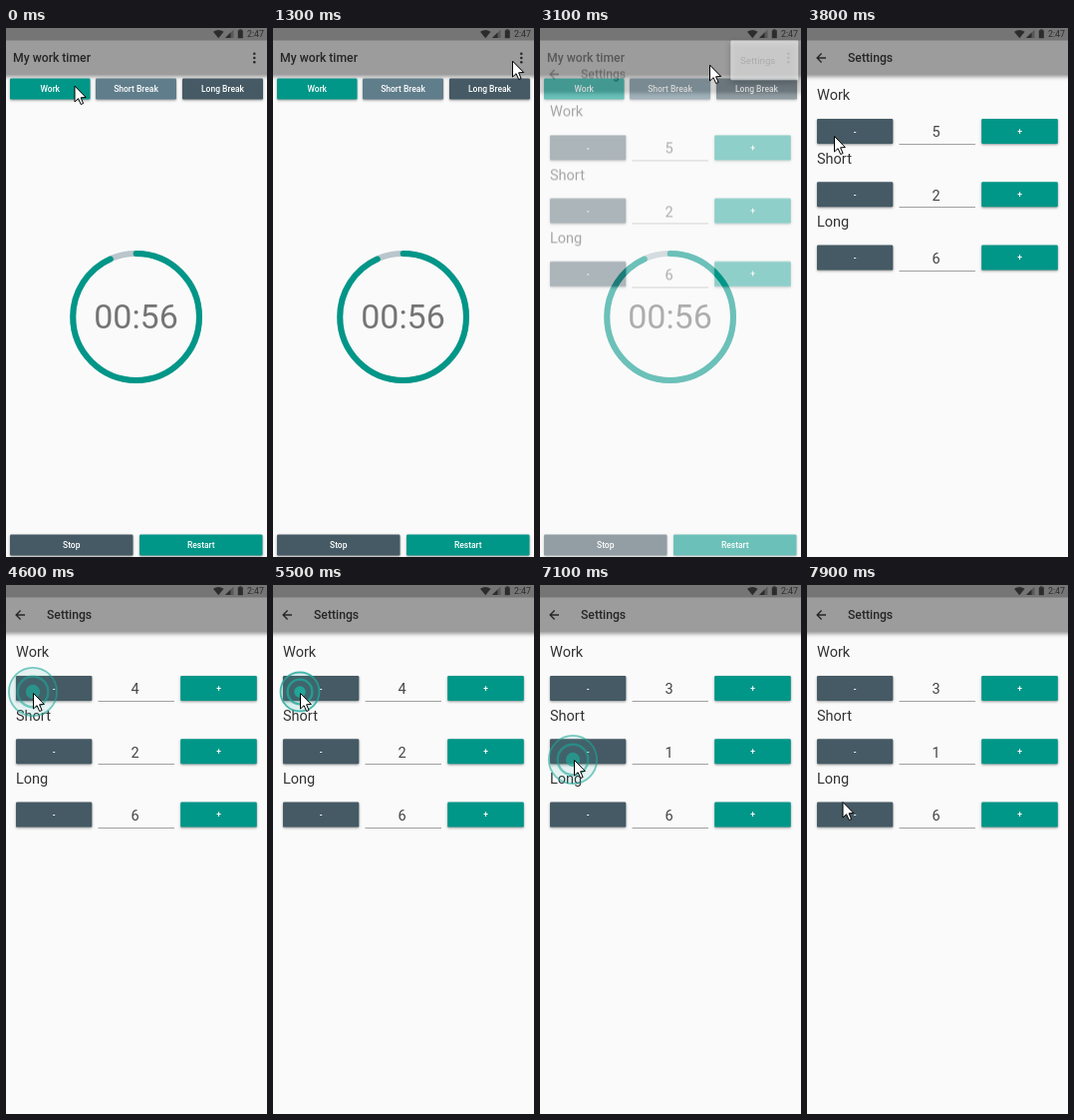
Write an HTML page with a canvas that moves like this. It is 262x530 px and loops after 8000 ms.

```html
<!DOCTYPE html>
<html lang="en">
<head>
<meta charset="utf-8">
<title>Work timer</title>
<style>
  html, body { margin: 0; width: 100%; height: 100%; overflow: hidden; background: #fafafa; }
  canvas { display: block; width: 262px; height: 530px; }
</style>
</head>
<body>
<canvas id="stage"></canvas>
<script>
const W = 262, H = 530, LOOP = 8000, STEP = 100;
const TEAL = '#009688', SLATE = '#455a64', STEEL = '#607d8b', INK = '#262626';
const FONT = 'Roboto, "Noto Sans", sans-serif';
const dpr = window.devicePixelRatio || 1;

function setup(canvas) {
  canvas.width = W * dpr;
  canvas.height = H * dpr;
  const c = canvas.getContext('2d');
  c.scale(dpr, dpr);
  return c;
}
const stage = document.getElementById('stage');
const ctx = setup(stage);
const layer = document.createElement('canvas');
const layerCtx = setup(layer);

const clamp = v => Math.min(1, Math.max(0, v));
const span = (t, a, b) => clamp((t - a) / (b - a));

// Cubic bezier easing solved by bisection
function bezier(x1, y1, x2, y2) {
  const at = (u, a, b) => 3 * u * (1 - u) * (1 - u) * a + 3 * u * u * (1 - u) * b + u * u * u;
  return x => {
    let lo = 0, hi = 1;
    for (let i = 0; i < 24; i++) {
      const mid = (lo + hi) / 2;
      if (at(mid, x1, x2) < x) lo = mid; else hi = mid;
    }
    return at(lo, y1, y2);
  };
}
const fastOutSlowIn = bezier(0.4, 0, 0.2, 1);
const easeIn = bezier(0.42, 0, 1, 1);

function text(c, str, x, y, size, color, weight = 400, align = 'left') {
  c.font = `${weight} ${size}px ${FONT}`;
  c.textAlign = align;
  c.fillStyle = color;
  c.fillText(str, x, y);
}

function shadow(c, alpha, blur, dy) {
  c.shadowColor = `rgba(0,0,0,${alpha})`;
  c.shadowBlur = blur * dpr;
  c.shadowOffsetY = dy * dpr;
}

function button(c, label, x, y, w, h, color) {
  c.save();
  shadow(c, 0.4, 2.5, 1);
  c.fillStyle = color;
  c.beginPath();
  c.roundRect(x, y, w, h, 1.2);
  c.fill();
  c.restore();
  text(c, label, x + w / 2, y + h / 2 + 3, 8.5, '#fff', 500, 'center');
}

function page(c, title, x) {
  c.fillStyle = '#fafafa';
  c.fillRect(0, 0, W, H);
  c.save();
  shadow(c, 0.4, 4, 2);
  c.fillStyle = '#9c9c9c';
  c.fillRect(-6, -6, W + 12, 52.5);
  c.restore();
  text(c, title, x, 34.3, 12.2, INK, 500);
}

function timerPage(c) {
  page(c, 'My work timer', 7);
  c.fillStyle = INK;
  for (const y of [25.7, 30, 34.3]) {
    c.beginPath();
    c.arc(249.3, y, 1.25, 0, 7);
    c.fill();
  }
  button(c, 'Work', 4, 50.5, 80.5, 21, TEAL);
  button(c, 'Short Break', 90, 50.5, 81, 21, STEEL);
  button(c, 'Long Break', 177, 50.5, 81, 21, SLATE);

  const top = -Math.PI / 2;
  c.lineWidth = 6;
  c.lineCap = 'round';
  c.strokeStyle = '#b9c6cb';
  c.beginPath();
  c.arc(130.6, 289.5, 63.4, 0, 7);
  c.stroke();
  c.strokeStyle = TEAL;
  c.beginPath();
  c.arc(130.6, 289.5, 63.4, top, top + 2 * Math.PI * 56 / 60);
  c.stroke();
  text(c, '00:56', 130.5, 301.3, 34, '#757575', 400, 'center');

  button(c, 'Stop', 4, 507.5, 123.5, 21, SLATE);
  button(c, 'Restart', 134, 507.5, 123.5, 21, TEAL);
}

function settingsPage(c, values) {
  page(c, 'Settings', 41);
  c.strokeStyle = INK;
  c.lineWidth = 1.3;
  c.lineCap = 'butt';
  c.beginPath();
  c.moveTo(19, 30);
  c.lineTo(10.5, 30);
  c.moveTo(14.6, 25.5);
  c.lineTo(10.1, 30);
  c.lineTo(14.6, 34.5);
  c.stroke();
  ['Work', 'Short', 'Long'].forEach((name, i) => {
    const y = i * 63.3;
    text(c, name, 10, y + 72.3, 14.5, '#333');
    button(c, '-', 10, y + 91, 76.3, 25, SLATE);
    button(c, '+', 175.2, y + 91, 76.6, 25, TEAL);
    text(c, values[i], 129.5, y + 109.2, 14.5, '#444', 400, 'center');
    c.fillStyle = '#a0a0a0';
    c.fillRect(92.5, Math.round(y + 116), 76.5, 1);
  });
}

function statusBar(c) {
  c.fillStyle = 'rgba(0,0,0,.25)';
  c.fillRect(0, 0, W, 12.5);
  c.fillStyle = '#2c2c2c';
  c.beginPath();
  c.moveTo(213.3, 10.3);
  c.lineTo(208, 3.8);
  c.quadraticCurveTo(213.3, 0.2, 218.6, 3.8);
  c.fill();
  c.globalAlpha = 0.4;
  c.beginPath();
  c.moveTo(220, 10);
  c.lineTo(228.5, 1.5);
  c.lineTo(228.5, 10);
  c.fill();
  c.globalAlpha = 1;
  c.beginPath();
  c.moveTo(220, 10);
  c.lineTo(225.5, 4.5);
  c.lineTo(225.5, 10);
  c.fill();
  c.fillRect(232.8, 2.2, 5, 8);
  c.fillRect(234.2, 1.2, 2.2, 1.2);
  text(c, '2:47', 242, 9.3, 8.8, '#2c2c2c', 400);
}

function popup(c, t) {
  const closing = t >= 2920;
  const p = closing ? span(1 - (t - 2920) / 300, 0, 2 / 3) : span(t, 1900, 2200);
  if (p <= 0) return;
  const grow = span(p, 0, 0.4);
  const alpha = closing ? p : span(p, 0, 1 / 3);
  const w = 68 * (0.4 + 0.6 * grow), h = 40 * grow;
  c.save();
  c.globalAlpha = alpha;
  c.save();
  shadow(c, 0.4, 6, 2.5);
  c.fillStyle = '#fff';
  c.beginPath();
  c.roundRect(259.3 - w, 12.3, w, h, 1.2);
  c.fill();
  c.restore();
  c.globalAlpha = alpha * span(p, 0.4, 1);
  text(c, 'Settings', 201, 35.6, 9.7, '#404040');
  c.restore();
}

const clicks = [[1500, 249, 31], [2600, 228, 33], [4300, 27, 107], [5300, 27, 107], [6800, 33, 175]];

function ripple(c, t) {
  for (const [start, x, y] of clicks) {
    const age = t - start;
    if (age < 0 || age >= 500) continue;
    const r = 10.5 + age * 0.047;
    const fade = 1 - span(age, 200, 560);
    const circle = k => { c.beginPath(); c.arc(x, y, r * k, 0, 7); };
    c.save();
    c.fillStyle = c.strokeStyle = '#1fa99b';
    c.globalAlpha = 0.14 * fade;
    circle(1);
    c.fill();
    c.globalAlpha = 0.8 * fade;
    c.lineWidth = 1.8;
    circle(0.98);
    c.stroke();
    c.lineWidth = 2.4;
    circle(0.62);
    c.stroke();
    c.globalAlpha = 0.95 * fade;
    circle(0.29);
    c.fill();
    c.restore();
  }
}

// time, x, y of the pointer tip
const path = [
  [800, 193, 33], [1300, 240, 33], [1400, 240, 33], [1500, 249, 31],
  [2200, 249, 31], [2300, 244, 32], [2400, 228, 33], [3000, 228, 33],
  [3100, 170, 37], [3200, 122, 60], [3400, 62, 92], [3500, 45, 100],
  [3600, 34, 105], [3800, 27, 108], [5700, 27, 108], [5800, 28, 118],
  [5900, 31, 142], [6000, 33, 166], [6100, 34, 175], [7500, 34, 175],
  [7600, 35, 181], [7700, 35, 196], [7800, 35, 211], [7900, 35.5, 217]
];

function pointerAt(t) {
  if (t < 300) return [68.5, 58];
  if (t < 800) return null;
  const i = path.findIndex(k => k[0] > t);
  if (i < 0) return path[path.length - 1].slice(1);
  const a = path[i - 1], b = path[i], p = span(t, a[0], b[0]);
  return [a[1] + (b[1] - a[1]) * p, a[2] + (b[2] - a[2]) * p];
}

function pointer(c, t) {
  const pos = pointerAt(t);
  if (!pos) return;
  c.save();
  c.translate(pos[0] + 0.5, pos[1] + 0.5);
  c.beginPath();
  c.moveTo(0, 0);
  c.lineTo(0, 15.5);
  c.lineTo(3.6, 12.2);
  c.lineTo(6.2, 18);
  c.lineTo(8.6, 17);
  c.lineTo(6.1, 11.3);
  c.lineTo(10.8, 11);
  c.closePath();
  c.fillStyle = '#fff';
  c.fill();
  c.strokeStyle = '#000';
  c.lineWidth = 1;
  c.stroke();
  c.restore();
}

function draw(t) {
  const p = span(t, 2920, 3220);
  const values = [t < 4600 ? 5 : t < 5600 ? 4 : 3, t < 7100 ? 2 : 1, 6];
  if (p < 1) timerPage(ctx);
  if (p > 0 && p < 1) {
    layerCtx.clearRect(0, 0, W, H);
    settingsPage(layerCtx, values);
    ctx.globalAlpha = easeIn(p);
    ctx.drawImage(layer, 0, (1 - fastOutSlowIn(p)) * H / 4, W, H);
    ctx.globalAlpha = 1;
  }
  if (p === 1) settingsPage(ctx, values);
  popup(ctx, t);
  statusBar(ctx);
  ripple(ctx, t);
  pointer(ctx, t);
}

let begin = null;
function tick(now) {
  if (begin === null) begin = now;
  const t = (now - begin) % LOOP;
  draw(Math.floor(t / STEP) * STEP);
  requestAnimationFrame(tick);
}
draw(0);
requestAnimationFrame(tick);
</script>
</body>
</html>
```
